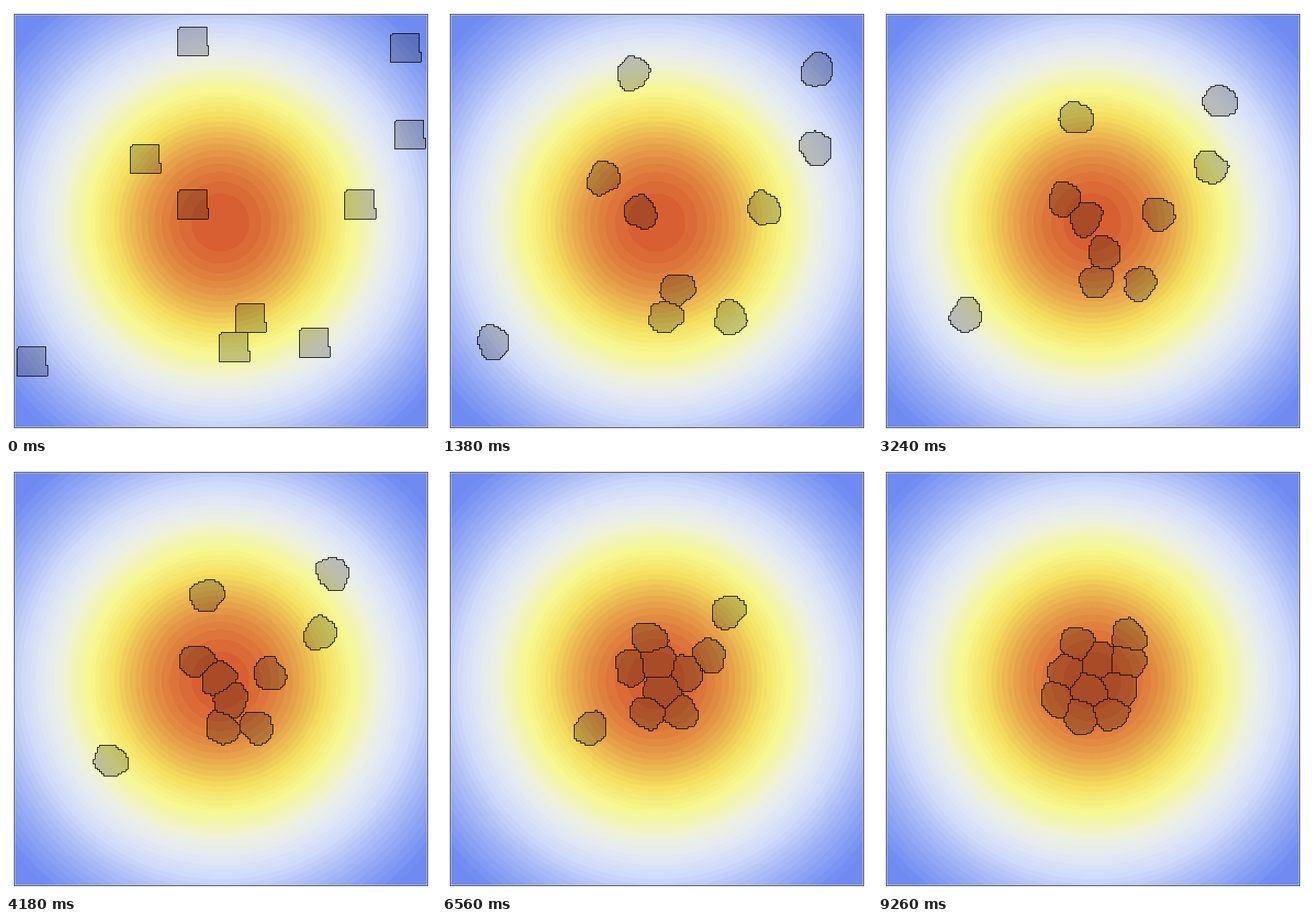
Animation of 600 by 600 pixels, one loop 9.28 s. Source, as a matplotlib script:

```python
import numpy as np
import matplotlib.pyplot as plt
from matplotlib.animation import FuncAnimation

SIZE, GRID, LEFT = 600, 200, 12
SITE = 576 / GRID
STEPS, TICKS = 200, 464
AREA = 200

# Top-left lattice corner of every cell at the start
CORNERS = np.array([(79, 6), (182, 9), (184, 51), (56, 63), (79, 85),
                    (160, 85), (107, 140), (99, 154), (138, 152), (1, 161)])
CELLS = len(CORNERS)
GOAL = np.array([99.5, 100.5])

# Movement, in lattice sites per step
SPEED, SLOWING = .54, 26
CONTACT, PUSH = 14.6, .15

rng = np.random.default_rng(4)
MODES = np.array([2, 3, 5, 7])
AMPS = np.array([.07, .05, .03, .018])
PHASE = rng.uniform(0, 2 * np.pi, (CELLS, 4))
SPIN = rng.uniform(-.22, .22, (CELLS, 4))


def move(pos):
    """Climb towards the goal, slowing near it, and push touching cells away."""
    to_goal = GOAL - pos
    dist = np.linalg.norm(to_goal, axis=1, keepdims=True) + 1e-9
    drift = SPEED * np.tanh(dist / SLOWING) * to_goal / dist
    apart = pos[:, None] - pos
    gap = np.linalg.norm(apart, axis=2, keepdims=True) + 1e-9
    push = PUSH * np.maximum(0, CONTACT - gap) * apart / gap
    return pos + drift + push.sum(axis=1)


def start_labels():
    lab = np.zeros((GRID, GRID), np.uint8)
    for c, (x, y) in enumerate(CORNERS, 1):
        lab[y:y + 14, x:x + 14] = c
        lab[y, x] = 0
        lab[y + 9:y + 14, x + 14] = c
    return lab


def patch(c, x, y, step):
    """Window around a cell and the wobbly distance to its centre."""
    i, j = int(x), int(y)
    win = (slice(max(j - 15, 0), min(j + 16, GRID)),
           slice(max(i - 15, 0), min(i + 16, GRID)))
    gy, gx = np.mgrid[win]
    dx, dy = gx + .5 - x, gy + .5 - y
    box = max(0, 1 - step / 8)
    dist = (1 - box) * np.hypot(dx, dy) + box * 1.12 * np.maximum(abs(dx), abs(dy))
    theta = np.arctan2(dy, dx)[..., None]
    wave = np.cos(MODES * theta + PHASE[c] + SPIN[c] * step) @ AMPS
    return win, dist / (1 + (1 - box) * wave)


def assign(patches, radius):
    """Give each site to the cell that reaches deepest over it."""
    lab = np.zeros((GRID, GRID), np.uint8)
    best = np.zeros((GRID, GRID))
    for c, (win, dist) in enumerate(patches):
        score = dist - radius[c]
        closer = score < best[win]
        best[win][closer] = score[closer]
        lab[win][closer] = c + 1
    return lab


def grow_history():
    """Lattice labels of every step; radii adapt so that areas stay constant."""
    history = [start_labels()]
    pos = CORNERS + 7.1
    radius = np.full(CELLS, 8.)
    for step in range(1, STEPS):
        pos = move(pos)
        patches = [patch(c, x, y, step) for c, (x, y) in enumerate(pos)]
        for _ in range(4):
            lab = assign(patches, radius)
            area = np.bincount(lab.ravel(), minlength=CELLS + 1)[1:]
            radius = np.clip(radius + (AREA - area) / 60, 6.5, 11.5)
        history.append(assign(patches, radius))
    return history


def background():
    """Banded Gaussian field inside a thin double frame."""
    py, px = np.mgrid[:SIZE, :SIZE]
    r2 = (px - 298.5) ** 2 + (py - 301.5) ** 2
    delta = .0179
    band = np.floor((1 - np.exp(-r2 / 90720)) / delta)
    level = (band + .5) * delta
    stops = [0, .22, .31, .42, .48, .56, .79]
    tones = np.array([(215, 90, 48), (245, 226, 98), (248, 248, 145), (239, 241, 222),
                      (230, 235, 242), (210, 220, 250), (111, 139, 242)])
    img = np.stack([np.interp(level, stops, t) for t in tones.T], axis=-1)
    edge = np.maximum(abs(px - 299.5), abs(py - 299.5))
    img[edge > 287] = (192, 192, 208)
    img[edge > 288] = (64, 64, 64)
    img[edge > 289] = 255
    return img.astype(np.uint8)


BACK = background()
SHADE = (BACK * .79).astype(np.uint8)
INDEX = np.clip(np.floor((np.arange(SIZE) - 11.2) / SITE), 0, GRID - 1).astype(int)
HISTORY = grow_history()


def render(step):
    lab = HISTORY[step][INDEX[:, None], INDEX]
    img = np.where(lab[..., None] > 0, SHADE, BACK)
    line = np.zeros(lab.shape, bool)
    line[:, 1:] |= lab[:, 1:] != lab[:, :-1]
    line[1:] |= lab[1:] != lab[:-1]
    img[line] = 0
    return img


fig = plt.figure(figsize=(6, 6), dpi=100, facecolor="white")
picture = fig.figimage(render(0), origin="upper")
shown = {"step": 0}


def update(tick):
    # Steps last 20, 100 and 20 ms in turn
    group, part = divmod(tick, 7)
    step = 3 * group + (part >= 1) + (part >= 6)
    if step != shown["step"]:
        picture.set_data(render(step))
        shown["step"] = step
    return picture,


anim = FuncAnimation(fig, update, frames=TICKS, interval=20, repeat=True,
                     repeat_delay=0, cache_frame_data=False)
plt.show()
```
